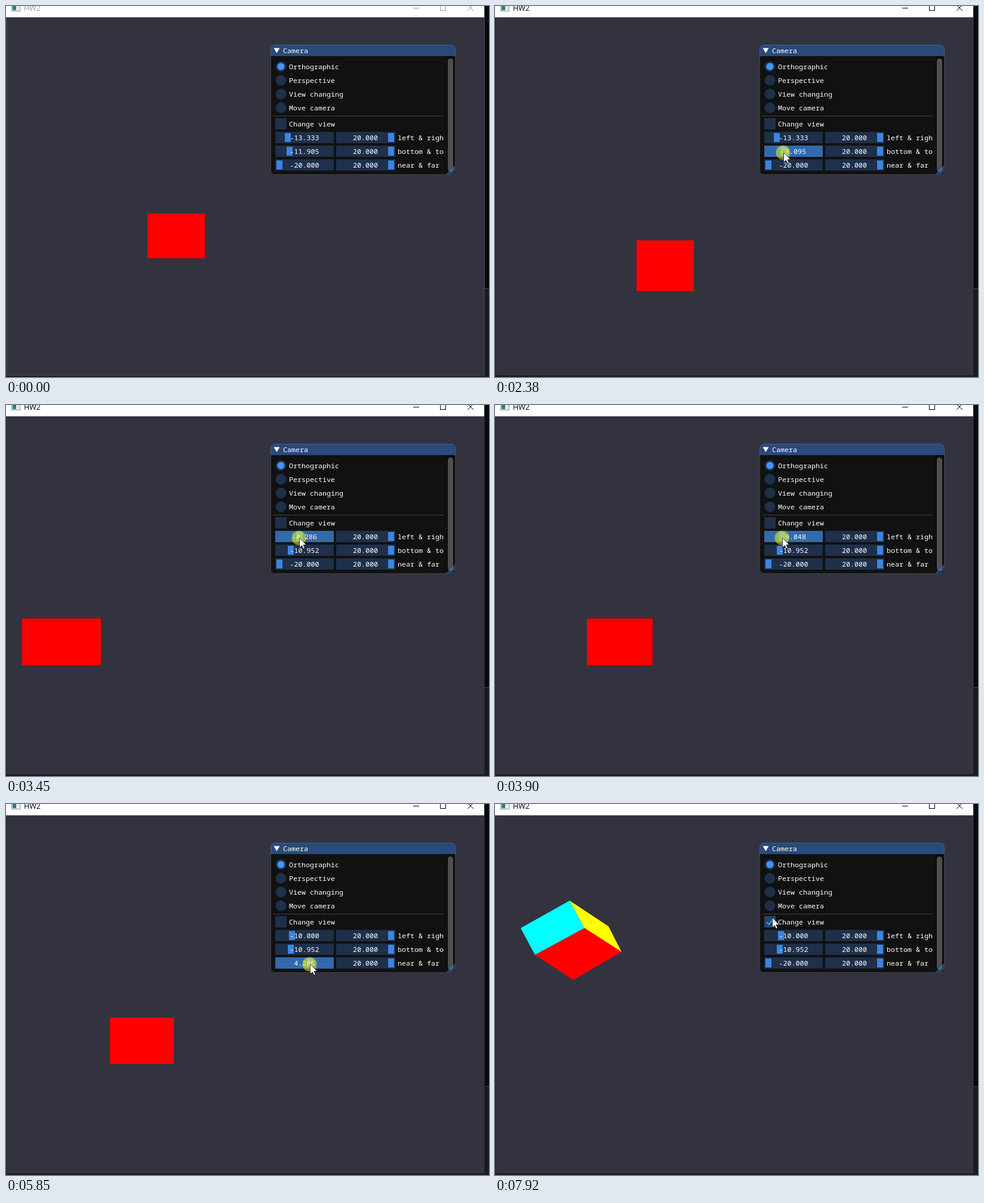
Animation of 809 by 622 pixels, one loop 8 s. Source, as an HTML page with a canvas:

```html
<!DOCTYPE html>
<html>
<head>
<meta charset="utf-8">
<style>
html, body { margin: 0; height: 100%; overflow: hidden; background: #111; }
canvas { display: block; }
</style>
</head>
<body>
<canvas id="stage" width="809" height="622"></canvas>
<script>
const ctx = document.getElementById('stage').getContext('2d');
const LOOP = 8000, STEP = 77.2, START = 195, NOTCHES = 84;
const FRAME = '#1e304a', HOVER = '#25466f', ACTIVE = '#326aad';
const GRAB = '#3d85e0', BRIGHT = '#4296fa';

const makeSlider = (label, row, notch) => ({ label, y: 211 + 23 * row, notch });
const left = makeSlider('left & righ', 0, 14);
const bottom = makeSlider('bottom & to', 1, 17);
const near = makeSlider('near & far', 2, 0);
const sliders = [left, bottom, near];

// The pointer eases from stop to stop; a drag sets its stops by slider notch
const stops = [];
const move = (step, x, y) => stops.push({ step, x, y });
function drag(slider, ...keys) {
  keys.forEach(([step, notch]) => move(step, 458 + notch, slider.y + 11));
  slider.from = keys[0][0];
  slider.to = keys[keys.length - 1][0];
}

move(0, 638, 537);
move(6, 548, 263);
move(12, 603, 165);
move(17, 518, 218);
drag(bottom, [26, 17], [30, 32], [35, 20], [36, 19]);
drag(left, [41, 24], [42, 33], [44, 37], [48, 23], [52, 21]);
move(57, 475, 257);
drag(near, [61, 6], [65, 24], [77, 60], [83, 84], [85, 52], [89, 0]);
move(95, 461, 216);
move(99, 464, 190);

const FOCUS = bottom.from, CHECK_PRESS = 99;

function pointer(step) {
  const i = stops.findIndex(s => s.step >= step);
  if (i < 1) return stops.at(Math.min(i, 0));
  const a = stops[i - 1], b = stops[i];
  const u = (step - a.step) / (b.step - a.step), ease = u * u * (3 - 2 * u);
  const mix = key => Math.round(a[key] + (b[key] - a[key]) * ease);
  return { x: mix('x'), y: mix('y') };
}

function notchAt(slider, step) {
  if (step < slider.from) return slider.notch;
  const notch = pointer(Math.min(step, slider.to)).x - 458;
  return Math.max(0, Math.min(NOTCHES, notch));
}

const valueAt = (slider, step) => -20 + notchAt(slider, step) * 40 / NOTCHES;
const heldAt = step => sliders.find(s => step >= s.from && step <= s.to);

function rect(x, y, w, h, color) {
  ctx.fillStyle = color;
  ctx.fillRect(x, y, w, h);
}

function circle(x, y, r, color) {
  ctx.fillStyle = color;
  ctx.beginPath();
  ctx.arc(x, y, r, 0, 7);
  ctx.fill();
}

function round(x, y, w, h, r, color) {
  ctx.fillStyle = color;
  ctx.beginPath();
  ctx.roundRect(x, y, w, h, r);
  ctx.fill();
}

function trace(points) {
  ctx.beginPath();
  points.forEach(p => ctx.lineTo(...p));
}

function poly(color, ...points) {
  ctx.fillStyle = color;
  trace(points);
  ctx.fill();
}

function line(color, width, ...points) {
  ctx.strokeStyle = color;
  ctx.lineWidth = width;
  trace(points);
  ctx.stroke();
}

function text(str, x, y, align = 'left') {
  ctx.font = '11.67px "Noto Sans Mono", monospace';
  ctx.fillStyle = '#fff';
  ctx.textAlign = align;
  ctx.fillText(str, x, y);
}

function drawWindow(focused) {
  rect(0, 0, 809, 622, '#1b1b1c');
  rect(801, 0, 8, 473, '#0a0a0a');
  rect(801, 473, 8, 1, '#454545');
  rect(0, 0, 802, 620, focused ? '#222225' : '#434347');
  rect(1, 19, 800, 600, '#333340');
  rect(0, 0, 801, 19, '#fff');

  rect(9, 0, 15, 9, '#8d9599');
  rect(10, 0, 13, 8, '#e8ecec');
  rect(11, 0, 6, 7, '#2f7d78');
  const ink = focused ? '#000' : '#999';
  ctx.font = '12.5px "Open Sans", sans-serif';
  ctx.textAlign = 'left';
  ctx.fillStyle = ink;
  ctx.fillText('HW2', 30, 8);
  line(ink, 1, [682, 3.5], [692, 3.5]);
  ctx.strokeRect(727.5, -1.5, 9, 9);
  line(ink, 1, [773, -2], [783, 8]);
  line(ink, 1, [783, -2], [773, 8]);
}

// A 4 x 4 face in the orthographic view volume set by the sliders
function drawFace(step) {
  const l = valueAt(left, step), b = valueAt(bottom, step);
  if (valueAt(near, step) > 14) return;
  const px = x => Math.max(1, Math.round(1 + (x - l) * 800 / (20 - l)));
  const py = y => Math.round(19 + (20 - y) * 600 / (20 - b));
  rect(px(-3.5), py(2.5), px(0.5) - px(-3.5), py(-1.5) - py(2.5), '#f00');
}

function drawCube() {
  poly('#0ff', [125, 162], [43, 208], [67, 253], [150, 208]);
  poly('#ff0', [125, 162], [190, 205], [212, 248], [150, 208]);
  poly('#f00', [67, 253], [150, 208], [212, 248], [131, 295]);
}

function drawPanel(step, { x, y }) {
  const held = heldAt(step), checked = step > CHECK_PRESS;
  const idle = (l, top, w) => step >= FOCUS && !held &&
    x >= l && x < l + w && y >= top && y < top + 19 ? HOVER : FRAME;

  round(443, 65, 310, 218, 7, '#111112');
  round(443, 65, 310, 19, [7, 7, 0, 0], '#294a7a');
  poly('#fff', [448.5, 70.5], [458.5, 70.5], [453.5, 79]);
  text('Camera', 464, 79);

  ['Orthographic', 'Perspective', 'View changing', 'Move camera'].forEach((label, i) => {
    const top = 92 + 23 * i;
    circle(460.5, top + 9.5, 9, idle(451, top, 110));
    if (!i) circle(460.5, top + 9.5, 6, BRIGHT);
    text(label, 474, top + 14);
  });
  rect(447, 184, 286, 1, '#404049');

  rect(451, 188, 19, 19, step === CHECK_PRESS ? ACTIVE : idle(451, 188, 100));
  if (checked) line(BRIGHT, 2, [455, 198], [459, 202], [466, 193]);
  text('Change view', 474, 202);

  for (const s of sliders) {
    const active = s === held;
    rect(451, s.y, 98, 19, active ? ACTIVE : idle(451, s.y, 98));
    rect(453 + notchAt(s, step), s.y + 2, 10, 15, active ? BRIGHT : GRAB);
    text(valueAt(s, step).toFixed(3), 500, s.y + 14, 'center');
    rect(553, s.y, 99, 19, idle(553, s.y, 99));
    rect(640, s.y + 2, 10, 15, GRAB);
    text('20.000', 602, s.y + 14, 'center');
    text(s.label, 656, s.y + 14);
  }

  round(738, 84, 14, 198, [0, 0, 6, 0], '#0b0b0c');
  round(740, 88, 9, 190, 4.5, '#4f4f4f');
  poly('rgba(66,150,250,.4)', [752, 267], [752, 277], [747, 282], [737, 282]);
  ctx.beginPath();
  ctx.roundRect(443.5, 65.5, 309, 217, 7);
  ctx.strokeStyle = 'rgba(110,110,128,.5)';
  ctx.lineWidth = 1;
  ctx.stroke();
}

function drawPointer(step, { x, y }) {
  if (heldAt(step) || step === CHECK_PRESS) circle(x - 0.5, y + 0.8, 12, 'rgba(255,255,0,.5)');
  ctx.save();
  ctx.translate(x + 0.5, y + 0.5);
  const arrow = [[0, 0], [0, 16.5], [3.8, 13], [6.3, 18.5], [8.8, 17.5], [6.4, 12], [11.5, 12], [0, 0]];
  poly('#fff', ...arrow);
  line('#000', 0.7, ...arrow);
  ctx.restore();
}

function draw(t) {
  const step = Math.floor((t - START) / STEP), p = pointer(step);
  drawWindow(step >= FOCUS);
  if (step > CHECK_PRESS) drawCube();
  else drawFace(step);
  drawPanel(step, p);
  if (step >= 0) drawPointer(step, p);
}

const begin = performance.now();
function tick() {
  draw((performance.now() - begin) % LOOP);
  requestAnimationFrame(tick);
}
tick();
</script>
</body>
</html>
```
